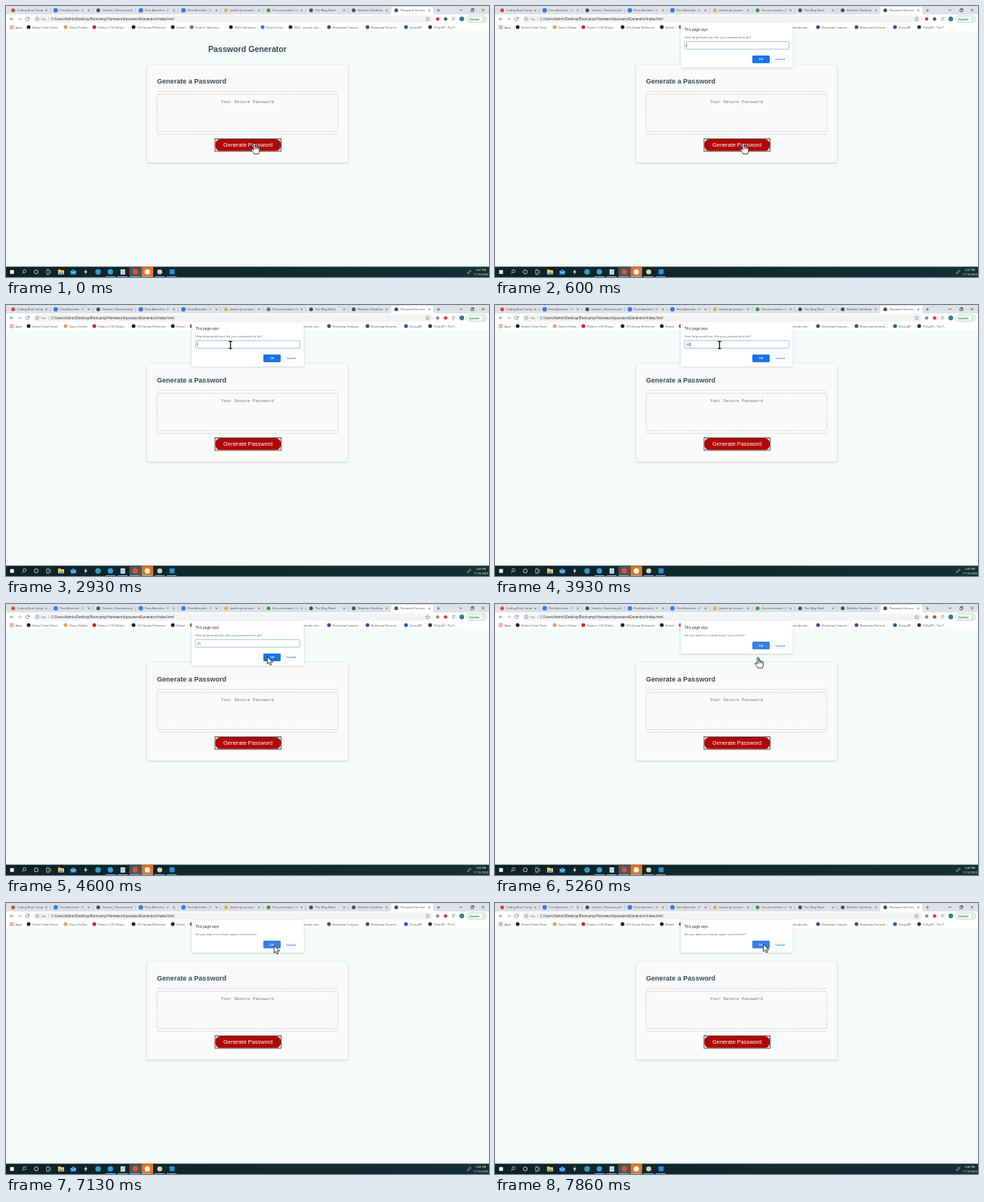
Recreate the animation shown at these times as an HTML page. Size 640 by 360 pixels, loop 8 s.

```html
<!DOCTYPE html>
<html lang="en">
<head>
<meta charset="utf-8">
<title>Password Generator</title>
<style>
  html, body { margin: 0; width: 100%; height: 100%; overflow: hidden; background: #f4fbfa; }
  svg { display: block; width: 100%; height: 100%; }
  text { font-family: "Open Sans", "Noto Sans", sans-serif; white-space: pre; }
  .page text { font-family: "Liberation Sans", Arial, sans-serif; }
  .page .mono { font-family: "Liberation Mono", monospace; }
</style>
</head>
<body>
<svg viewBox="0 0 640 360">
  <defs>
    <filter id="soft" x="-10%" y="-10%" width="120%" height="130%">
      <feDropShadow dx="0" dy=".8" stdDeviation="1.5" flood-color="#000" flood-opacity=".2"/>
    </filter>
    <linearGradient id="bar">
      <stop offset="0" stop-color="#0d2126"/>
      <stop offset="1" stop-color="#133034"/>
    </linearGradient>
  </defs>
  <rect width="640" height="360" fill="#f4fbfa"/>

  <g class="page">
    <text x="320" y="61" text-anchor="middle" font-size="10.63" font-weight="700" fill="#3b4954">Password Generator</text>
    <rect x="187" y="78" width="266" height="130" rx="1.5" fill="#fafafa" filter="url(#soft)"/>
    <text x="200" y="103" font-size="9.05" font-weight="700" fill="#3b4954">Generate a Password</text>
    <path d="M200 113.3H440M200 170.5H440" stroke="#d6d9da" stroke-width=".7"/>
    <rect x="200.3" y="117.3" width="239.4" height="49.4" rx="1.5" fill="none" stroke="#c0c4c6" stroke-width=".8" stroke-dasharray="2.2 1.4"/>
    <text class="mono" x="320" y="128.8" text-anchor="middle" font-size="5.84" fill="#757575">Your Secure Password</text>
    <rect x="277" y="176.5" width="87.5" height="16.5" fill="#fff" stroke="#222" stroke-width=".8"/>
    <rect x="277.4" y="176.9" width="86.7" height="15.7" rx="6.5" fill="#b10707"/>
    <text x="320.6" y="187.2" text-anchor="middle" font-size="7.36" fill="#fff">Generate Password</text>
  </g>

  <g id="browser"></g>
  <g id="taskbar"></g>

  <g id="dialog">
    <rect id="panel" x="246" y="23" width="148.5" rx="1.5" fill="#fff" filter="url(#soft)"/>
    <text x="251" y="33.2" font-size="4.65" fill="#202124">This page says</text>
    <text id="question" x="251" y="42.5" font-size="4.1" fill="#5f6368"></text>
    <g id="field">
      <rect x="251" y="47.3" width="138.3" height="10" rx=".8" fill="#fff" stroke="#86a9da" stroke-width=".7"/>
      <text id="entry" x="253.2" y="53.7" font-size="4.1" fill="#333"></text>
      <rect id="caret" y="49.6" width=".6" height="5.2" fill="#222"/>
    </g>
    <g id="buttons">
      <rect id="ok" x="341" y="0" width="23" height="10.2" rx="1.4"/>
      <text x="352.4" y="6.5" text-anchor="middle" font-size="4" font-weight="600" fill="#fff">OK</text>
      <rect x="366.7" y=".2" width="22.6" height="9.8" rx="1.4" fill="#fff" stroke="#e6e8eb" stroke-width=".5"/>
      <text x="378" y="6.5" text-anchor="middle" font-size="4" font-weight="600" fill="#2f73d8">Cancel</text>
    </g>
  </g>

  <g id="cursor" stroke-linejoin="round" stroke-linecap="round">
    <path id="arrow" d="M0 0V9.6L2.3 7.5L3.9 11L5.6 10.2L4 6.9H7Z" fill="#fff" stroke="#111" stroke-width=".8"/>
    <path id="beam" d="M-2.2-4.6H2.2M0-4.6V4.8M-2.2 4.8H2.2" fill="none" stroke="#111" stroke-width="1.3" stroke-linecap="butt"/>
    <g id="hand" stroke="#111" stroke-width=".8">
      <path d="M-1.1 8.6V.9Q-1.1-.2 0-.2T1.1.9V4.7Q2-.0 3.1 5Q4.3 3.7 5 5.5Q6.9 4.6 6.9 7V9.8Q6.8 12 5.7 14H-.2Q-1 11.8-3.6 9.2Q-4.5 7.8-3.3 7.2Q-2.2 6.9-1.1 8.6Z" fill="#fff"/>
      <path d="M1.1 5V7.3M3.1 5.2V7.4M5 5.7V7.6" fill="none"/>
    </g>
  </g>
</svg>

<script>
const $ = id => document.getElementById(id);
const rect = (x, y, w, h, fill, extra = '') => `<rect x="${x}" y="${y}" width="${w}" height="${h}" fill="${fill}" ${extra}/>`;
const dot = (x, y, r, fill) => `<circle cx="${x}" cy="${y}" r="${r}" fill="${fill}"/>`;
const line = (d, color, width = .7) => `<path d="${d}" fill="none" stroke="${color}" stroke-width="${width}"/>`;
const label = (x, y, size, str, fill = '#4a4e52', extra = '') =>
  `<text x="${x}" y="${y}" font-size="${size}" fill="${fill}" ${extra}>${str}</text>`;

const DARK = '#4a4e52', GREY = '#9aa0a6', BLUE = '#2d7ff0';

function drawBrowser() {
  const tabs = [
    ['Coding Boot Camp', '#d5453a'], ['Post Attendee - V', BLUE], ['Grades | Bootcamp', DARK],
    ['Post Attendee - V', BLUE], ['Post Attendee - V', BLUE], ['JavaScript prepen', '#e8b03c'],
    ['Documentation | I', '#2f9e44'], ['The Mug Nook', DARK], ['Weather Dashboa', DARK], ['Password Genera', DARK]
  ];
  const bookmarks = [
    [7.5, 'Apps', '#d9594c'], [30, 'Kobrel Cheat Sheet', '#222'], [79, 'Query Hollow', '#ee9a5a'],
    [117, 'Floats in CSS (Vidpo...', '#e02020'], [169, 'CSS Syntax Reference', '#222'], [221, 'Kobrel', '#222'],
    [246, 'Code to Skip Intro...', '#c8542c'], [298, 'WLQ references', '#222'], [340, 'Orvelo Fonts', '#3478e0'],
    [377, 'WLQ - pseudo clas...', '#222'], [428, 'Bootstrap Compon...', '#5b3d8c'],
    [479, 'Bootstrap Docume...', '#5b3d8c'], [530, 'Zorvy API', '#1c5bb8'], [562, 'FLVq API - The F...', '#333']
  ];
  let out = rect(0, 0, 640, 11.5, '#dee1e6') + rect(0, 11.2, 640, 22, '#fff') +
    '<path d="M508.5 11.5Q510.5 11 510.5 9V3Q510.5 1 512.5 1H564Q566 1 566 3V9Q566 11 568 11.5Z" fill="#fff"/>';

  tabs.forEach(([name, color], i) => {
    const x = 9.5 + 56.4 * i;
    out += dot(x, 5.8, color === BLUE ? 3 : 2.5, color);
    out += label(x + 5.4, 7.3, 3.95, name);
    out += line(`M${x + 42.5} 4.5l2.6 2.6m0-2.6l-2.6 2.6`, DARK, .6);
    if (i < 8) out += line(`M${x + 49.3} 3V9`, GREY, .4);
  });
  out += line('M571 5.8h4m-2-2v4', DARK);
  out += line('M601 5.5h3.8M616 4.5h3v3h-3zM617 4.5v-1h3v3h-1M630.5 3.8l3.4 3.4m0-3.4l-3.4 3.4', '#222', .6);

  // Navigation row
  out += line('M10 17.2H5.5m2-2l-2 2l2 2', '#5f6368');
  out += line('M16 17.2h4.5m-2-2l2 2l-2 2', GREY);
  out += line('M30.7 16.5a2.3 2.3 0 1 0-.2 1.8M31 14.8v2h-2', '#5f6368');
  out += rect(36, 12.5, 530, 9.5, '#f1f3f4', 'rx="4.7"');
  out += line('M43.5 17.2a2.1 2.1 0 1 1-4.2 0a2.1 2.1 0 1 1 4.2 0M41.4 17v1.3M41.4 15.7v.6', '#5f6368', .55);
  out += label(46.5, 18.8, 4.2, 'File', '#5f6368') + line('M56.7 15V19.5', GREY, .4);
  out += label(59.5, 18.8, 4.4, 'C:/Users/Admin/Desktop/Bootcamp/Homework/passwordGenerator/index.html', '#202124');
  out += line('M558.7 14.5l.8 1.8l1.9.2l-1.4 1.3l.4 1.9l-1.7-1l-1.7 1l.4-1.9l-1.4-1.3l1.9-.2z', '#5f6368', .5);
  out += '<circle id="extA" cx="572" cy="17.2" r="2.3"/><circle id="extB" cx="582.5" cy="17.2" r="2.3"/>';
  out += line('M591 15.5h4.5M591 17.2h4.5M591 18.9h3', '#5f6368', .5);
  out += dot(604, 17.2, 3.1, '#2f7f94');
  out += rect(610, 13, 27, 8.5, '#f3faf5', 'rx="4.2" stroke="#84bd93" stroke-width=".5"');
  out += label(613.5, 18.7, 4, 'Update', '#1e7e3c', 'font-weight="600"');
  out += [15.2, 17.2, 19.2].map(y => dot(633, y, .5, '#1e7e3c')).join('');

  bookmarks.forEach(([x, name, color], i) => {
    if (i) out += dot(x, 28, 2.5, color);
    else for (let k = 0; k < 9; k++) out += rect(x - 2.4 + k % 3 * 1.8, 25.8 + (k / 3 | 0) * 1.8, 1.2, 1.2, color);
    out += label(x + 5, 29.5, 3.75, name);
  });
  $('browser').innerHTML = out;
}

function drawTaskbar() {
  let out = rect(0, 346.3, 640, 13.7, 'url(#bar)') + rect(163.5, 346.3, 15.5, 13.7, '#4b5558') + rect(179.5, 346.3, 15.5, 13.7, '#d9772b');
  out += rect(5.5, 350.8, 5, 5, '#fff');
  out += line('M26.5 352.3a2 2 0 1 1-4 0a2 2 0 1 1 4 0M23 353.8l-1.8 2', '#eee');
  out += line('M42.7 353.2a2.6 2.6 0 1 1-5.2 0a2.6 2.6 0 1 1 5.2 0', '#eee', .8);
  out += line('M53.5 351.5h4v3.7h-4zM59 351v4.7M53.5 350h4M53.5 356.7h4', '#ddd', .6);
  out += '<path d="M69 350h3l1 1h4v5.5h-8z" fill="#f2c44c"/>' + rect(70.5, 354, 5, 2.5, '#4aa0dc');
  out += '<path d="M85.5 352.5l3.7-2.7l3.7 2.7v4.2h-7.4z" fill="#2f8fe0"/>' + line('M85.5 352.5l3.7 2.3l3.7-2.3', '#fff');
  out += '<path d="M106.6 349.3l-3.3 4.5h2.2l-1 3.5l3.4-4.7h-2.2z" fill="#e8eef2"/>';
  out += dot(122, 353.2, 3.7, '#2a9fc0') + dot(138.3, 353.2, 3.6, '#2f9fe0');
  out += rect(151.8, 349.8, 6, 7, '#d5e6ec') + line('M153 352h3.6m-3.6 1.6h3.6m-3.6 1.6h2.4', '#5b93aa', .5);
  out += dot(171.2, 353.2, 3.6, '#d9503f') + dot(187.3, 353.2, 3.5, '#f5eee6');
  out += dot(203.7, 353.2, 3.3, '#d8d2b4') + rect(216.8, 349.8, 6.6, 6.6, '#2b8fdc');
  out += [132, 148, 164, 180, 197, 213].map(x => rect(x, 359.1, 13, .9, '#76b9ed')).join('');
  out += line('M611.5 355.5l.6-1.8l3-3l1.2 1.2l-3 3z', '#ddd', .6);
  out += '<text id="clock" x="629.3" y="351.9" text-anchor="middle" font-size="3.7" fill="#fff"></text>';
  out += label(629.3, 358.2, 3.7, '11/16/2020', '#fff', 'text-anchor="middle"');
  $('taskbar').innerHTML = out;
}

const LOOP = 8000;
const OPEN = 130, LOWER = 4830, UPPER = 6900;
const path = [
  [0, 329, 182.5], [800, 329, 182.5], [1640, 297.5, 53], [3930, 297.5, 53],
  [4700, 348.5, 71], [5300, 348.5, 71], [6400, 355, 58], [6930, 355, 58], [7400, 355.6, 55], [LOOP, 355.6, 55]
];

function pointerAt(t) {
  const i = path.findIndex(p => p[0] > t);
  const [t0, x0, y0] = path[i - 1], [t1, x1, y1] = path[i];
  const u = (t - t0) / (t1 - t0), e = u * u * (3 - 2 * u);
  return [x0 + (x1 - x0) * e, y0 + (y1 - y0) * e];
}

const show = (id, on) => $(id).setAttribute('display', on ? 'inline' : 'none');

function render(t) {
  const open = t >= OPEN, prompting = t < LOWER;
  const bottom = prompting ? 81.5 : 65.8;

  show('dialog', open);
  show('field', prompting);
  $('panel').setAttribute('height', bottom - 23);
  $('buttons').setAttribute('transform', `translate(0 ${bottom - 15.7})`);
  $('ok').setAttribute('fill', prompting ? '#1a73e8' : '#3a80df');
  $('question').textContent = prompting ? 'How long would you like your password to be?'
    : `Do you want to include ${t < UPPER ? 'lower' : 'upper'} case letters?`;

  const typed = '20'.slice(0, (t >= 3200) + (t >= 3530));
  $('entry').textContent = typed;
  $('caret').setAttribute('x', 253.2 + typed.length * 2.35);
  show('caret', (t + 620) % 1060 < 530);

  const later = t >= 2730;
  $('clock').textContent = later ? '3:48 PM' : '3:47 PM';
  $('extA').setAttribute('fill', later ? '#8a9094' : '#d93a34');
  $('extB').setAttribute('fill', later ? '#d93a34' : '#4a5654');

  // The page keeps its hand pointer while a dialog blocks it.
  const [x, y] = pointerAt(t);
  const inside = open && x > 246 && x < 394 && y < bottom;
  const shape = !inside ? 'hand' : prompting && y > 47 && y < 58 ? 'beam' : 'arrow';
  ['hand', 'beam', 'arrow'].forEach(id => show(id, id === shape));
  $('cursor').setAttribute('transform', `translate(${x} ${y})`);
}

drawBrowser();
drawTaskbar();
const start = performance.now();
(function tick() {
  render((performance.now() - start) % LOOP);
  requestAnimationFrame(tick);
})();
</script>
</body>
</html>
```
